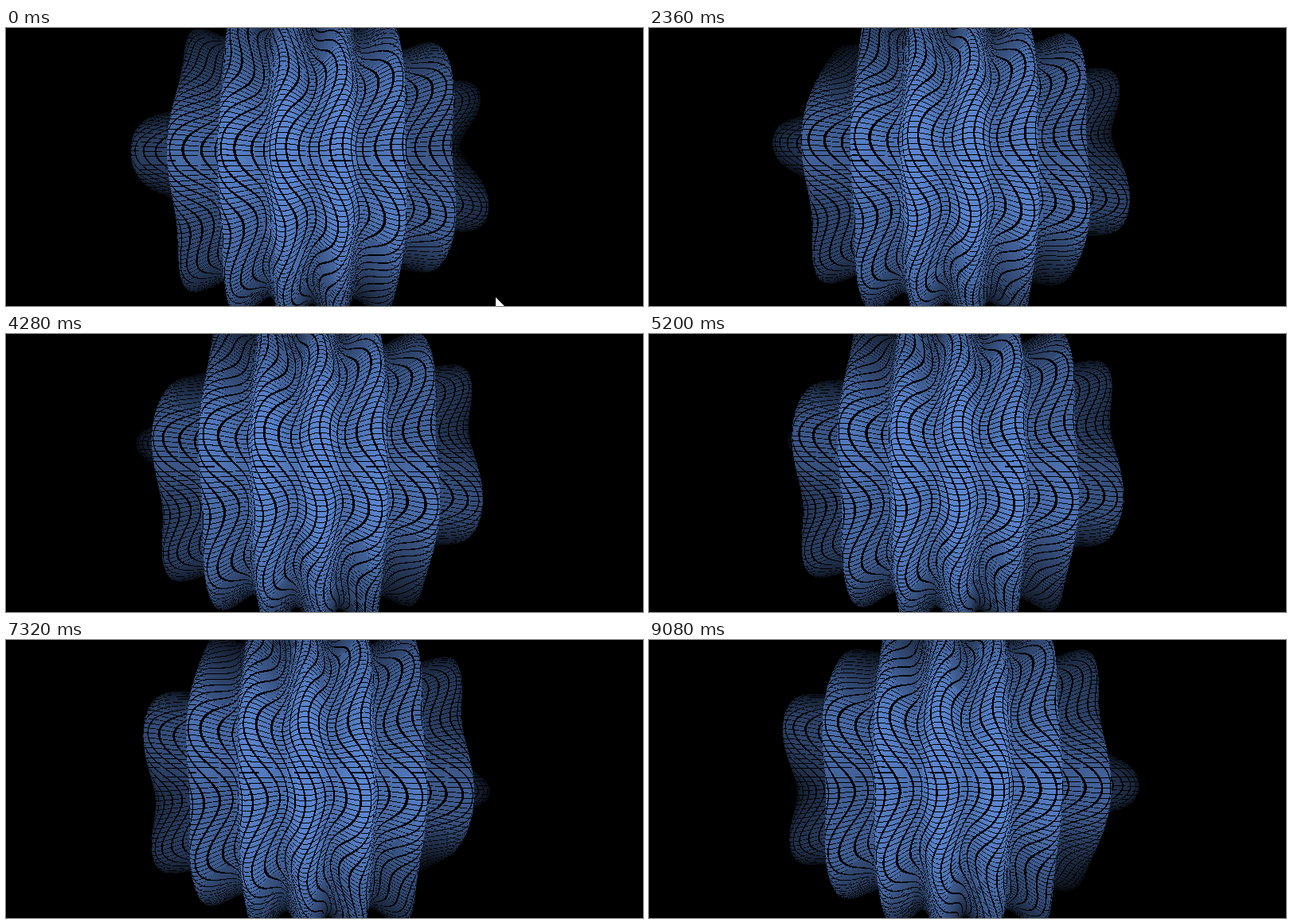
These frames come from a looping animation (800 by 350 pixels, 9100 ms). An HTML page with a canvas:

```html
<!DOCTYPE html>
<html lang="en">
<head>
<meta charset="utf-8">
<title>Rippling sphere</title>
<style>
html, body { margin: 0; width: 100%; height: 100%; overflow: hidden; background: #000; }
canvas { display: block; }
</style>
</head>
<body>
<canvas id="stage" width="800" height="350"></canvas>
<script>
const W = 800, H = 350, LOOP = 9100, STEP = 40;
const CX = 385, CY = 167, R = 193, EYE = 4.5;
const SUB_U = 3, SUB_V = 2;            // mesh steps per drawn grid cell
const CELLS = 120;                     // grid cells around, and from pole to pole
const COLS = CELLS / 2 * SUB_U, ROWS = CELLS * SUB_V, STRIDE = COLS + 1;
const ctx = document.getElementById('stage').getContext('2d');
const image = ctx.createImageData(W, H);
const pixels = new Uint32Array(image.data.buffer);
const depth = new Float32Array(W * H);
const count = STRIDE * (ROWS + 1);
const px = new Float32Array(count), py = new Float32Array(count), pz = new Float32Array(count);

function deform(t) {
  const swayY = -0.065 - 0.025 * t;    // where the sideways sway peaks
  const ridgeX = 0.14 - 0.0238 * t;    // where one ridge stands
  for (let j = 0, n = 0; j <= ROWS; j++) {
    const lat = (j / ROWS - 0.5) * Math.PI;
    const y = Math.sin(lat), ring = Math.cos(lat);
    const sway = 0.07 * Math.cos(8.2 * (y - swayY));
    for (let i = 0; i <= COLS; i++, n++) {
      const lon = (i / COLS - 0.5) * Math.PI;
      const x = ring * Math.sin(lon) - sway;
      const swell = 1 + 0.085 * Math.cos(22.4 * (x - ridgeX));
      const z = ring * Math.cos(lon) * swell;
      const scale = R * swell * EYE / (EYE - z);
      px[n] = CX + x * scale;
      py[n] = CY + y * scale;
      pz[n] = z;
    }
  }
}

const onLine = (f, half) => Math.abs(f - Math.round(f)) < half;

function shade(z, dim) {
  const b = Math.max(0, Math.min(1, 1.03 * z - 0.07)) * dim;
  return 0xff000000 | (208 * b) << 16 | (133 * b) << 8 | 91 * b;
}

// Each corner is a vertex index with its grid position (u, v).
function triangle(a, b, c, ua, va, ub, vb, uc, vc, lineU, lineV) {
  const ax = px[a], ay = py[a], bx = px[b], by = py[b], cx = px[c], cy = py[c];
  const area = (bx - ax) * (cy - ay) - (by - ay) * (cx - ax);
  if (!area) return;
  const x0 = Math.max(0, Math.ceil(Math.min(ax, bx, cx) - 0.5));
  const x1 = Math.min(W - 1, Math.floor(Math.max(ax, bx, cx) - 0.5));
  const y0 = Math.max(0, Math.ceil(Math.min(ay, by, cy) - 0.5));
  const y1 = Math.min(H - 1, Math.floor(Math.max(ay, by, cy) - 0.5));
  const dim = (lineU ? 1 : 0.86) * (lineV ? 1 : 0.88);
  for (let y = y0; y <= y1; y++) {
    for (let x = x0; x <= x1; x++) {
      const dx = x + 0.5 - ax, dy = y + 0.5 - ay;
      const q = (dx * (cy - ay) - dy * (cx - ax)) / area;
      const r = (dy * (bx - ax) - dx * (by - ay)) / area;
      const p = 1 - q - r;
      if (p < -1e-4 || q < -1e-4 || r < -1e-4) continue;
      const z = p * pz[a] + q * pz[b] + r * pz[c], at = y * W + x;
      if (z <= depth[at]) continue;
      depth[at] = z;
      const black = lineU && onLine(p * ua + q * ub + r * uc, 0.08) ||
                    lineV && onLine(p * va + q * vb + r * vc, 0.075);
      pixels[at] = black ? 0xff000000 : shade(z, dim);
    }
  }
}

function drawSphere(t) {
  deform(t);
  pixels.fill(0xff000000);
  depth.fill(-9);
  for (let j = 0; j < ROWS; j++) {
    for (let i = 0; i < COLS; i++) {
      const a = j * STRIDE + i, b = a + 1, c = a + STRIDE, d = c + 1;
      // Cells too narrow to resolve blend their lines into the fill.
      const lineU = Math.abs(px[b] - px[a]) * SUB_U > 2.5;
      const lineV = Math.abs(py[c] - py[a]) * SUB_V > 2;
      const u = i / SUB_U, v = j / SUB_V, u2 = u + 1 / SUB_U, v2 = v + 1 / SUB_V;
      triangle(a, b, c, u, v, u2, v, u, v2, lineU, lineV);
      triangle(b, d, c, u2, v, u2, v2, u, v2, lineU, lineV);
    }
  }
  ctx.putImageData(image, 0, 0);
}

function drawPointer(x, y) {
  ctx.fillStyle = '#fff';
  ctx.fill(new Path2D(`M${x} ${y}v16l4-4 3 6 2-1-3-6h5z`));
}

let shown = -1;
function frame(now) {
  const step = Math.floor(now % LOOP / STEP);
  if (step !== shown) {
    shown = step;
    drawSphere(step * STEP / 1000);
    if (step < 2) drawPointer(615 + 7 * step, 339 + 5 * step);
  }
  requestAnimationFrame(tick);
}
const start = performance.now();
function tick() {
  frame(Math.max(0, performance.now() - start));
}
tick();
</script>
</body>
</html>
```
